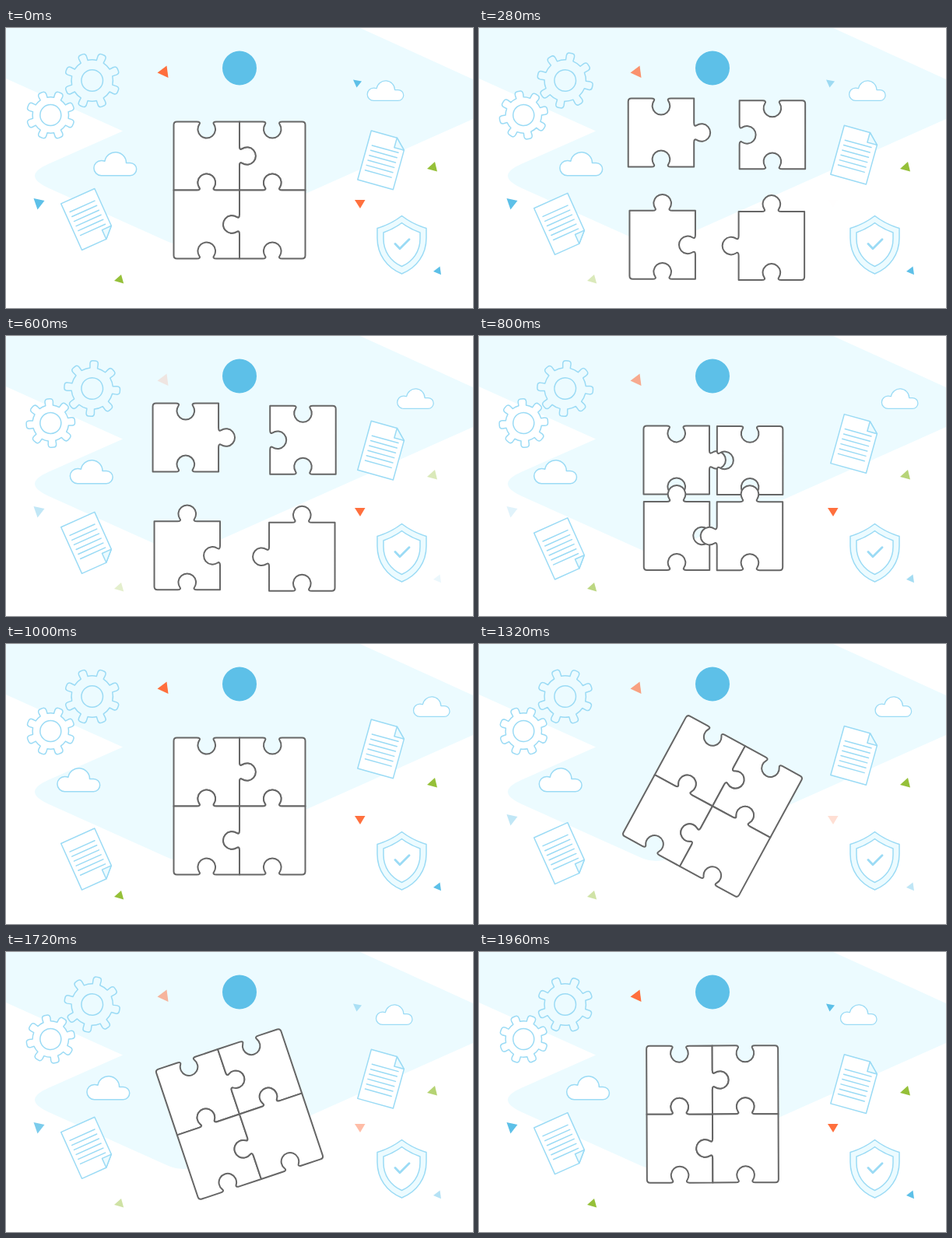
Write an HTML page that moves like this. It is 600x360 px and loops after 2 s.

```html
<!DOCTYPE html>
<html lang="en">
<head>
<meta charset="utf-8">
<title>Puzzle loop</title>
<style>
html, body { margin: 0; width: 100%; height: 100%; overflow: hidden; background: #fff; }
svg { display: block; width: 600px; height: 360px; }
.line { fill: none; stroke: #9bdbf5; stroke-width: 1.5; stroke-linejoin: round; stroke-linecap: round; }
.line * { vector-effect: non-scaling-stroke; }
.white { fill: #fff; }
.tint { fill: #ecfbff; }
.check { stroke-width: 2.8; }
#puzzle path { fill: #fff; stroke: #666; stroke-width: 2; stroke-linejoin: round; }
</style>
</head>
<body>
<svg viewBox="0 0 600 360">
  <defs>
    <path id="cloud" d="M9.6 0A9.6 9.6 0 0 1 9.6-19.2Q12-19.2 14-18.4A13.9 13.9 0 0 1 41.6-16.3H46.6A8.15 8.15 0 0 1 46.6 0Z"/>
    <g id="doc">
      <path class="white" d="M0 0H34.3L47.3 13V65.4H0Z"/>
      <path class="tint" d="M34.3 0V13H47.3Z"/>
      <path d="M6 18h35m-35 6.6h35m-35 6.6h35m-35 6.6h35m-35 6.6h35m-35 6.6h35"/>
    </g>
  </defs>
  <path class="tint" d="M0 0H455L600 66V117L247 274.5Q227 283.5 207 274.3L54 205.4Q20 190 54 175L150 132.5L0 65Z"/>
  <g class="line">
    <g id="gearBig"/>
    <g id="gearSmall" class="white"/>
    <g id="cloudLeft"><use href="#cloud" class="white" transform="translate(112.9 189.7)"/></g>
    <g id="cloudRight"><use href="#cloud" class="white" transform="translate(464.2 93.4) scale(.85)"/></g>
    <g id="docRight"><use href="#doc" transform="translate(469.3 132) rotate(15.5)"/></g>
    <g id="docLeft"><use href="#doc" transform="translate(97.5 285.5) rotate(-24.2) scale(1 -1)"/></g>
    <path class="tint" d="M508.5 241.5Q495 252 477 257.5V270C477 291 489 308 508.5 316C528 308 540 291 540 270V257.5Q522 252 508.5 241.5Z"/>
    <path class="white" d="M508.5 250.5Q498 258.5 485 263V271C485 287 494 300 508.5 306.5C523 300 532 287 532 271V263Q519 258.5 508.5 250.5Z"/>
    <path class="check" d="M500 277.5L506 283.7L518 271.7"/>
  </g>
  <g id="confetti"/>
  <circle cx="300" cy="51.5" r="22" fill="#5dc0e8"/>
  <g id="puzzle"/>
</svg>
<script>
const LOOP = 2000, CX = 300, CY = 208.5, W = 84.5, H = 88;
const ORANGE = '#ff6f3d', GREEN = '#95c038', BLUE = '#5dc0e8';
const $ = id => document.getElementById(id);

function add(parent, tag, attrs) {
  const el = document.createElementNS('http://www.w3.org/2000/svg', tag);
  for (const k in attrs) el.setAttribute(k, attrs[k]);
  return parent.appendChild(el);
}

// Gear with eight rounded teeth, centred on the origin
function gearPath(valley, tip) {
  const foot = 4.8, base = Math.sqrt(valley * valley - foot * foot);
  let d = '';
  for (let i = 0; i <= 8; i++) {
    const a = (i + .5) * Math.PI / 4, c = Math.cos(a), s = Math.sin(a);
    const p = (x, y) => `${(x * c + y * s).toFixed(2)} ${(x * s - y * c).toFixed(2)} `;
    d += (i ? `A${valley} ${valley} 0 0 1 ` : 'M') + p(-foot, base);
    if (i < 8) {
      d += 'L' + p(-5.2, tip - 4) + 'Q' + p(-5.2, tip) + p(-1.5, tip) +
        'L' + p(1.5, tip) + 'Q' + p(5.2, tip) + p(5.2, tip - 4) + 'L' + p(foot, base);
    }
  }
  return d + 'Z';
}

function makeGear(id, valley, tip, hole) {
  add($(id), 'path', { d: gearPath(valley, tip) });
  add($(id), 'circle', { r: hole });
}
makeGear('gearBig', 26.7, 35.8, 13.8);
makeGear('gearSmall', 23.2, 31.2, 13.5);

// Clockwise outline; tabs: 1 knob, -1 notch, 0 straight, from the top edge on
function piecePath(x, y, tabs, roundCorner) {
  const corners = [[x, y], [x + W, y], [x + W, y + H], [x, y + H]];
  const dirs = [[1, 0], [0, 1], [-1, 0], [0, -1]];
  let d = '';
  tabs.forEach((s, k) => {
    const [px, py] = corners[k], [dx, dy] = dirs[k];
    const len = k % 2 ? H : W, m = len / 2, next = (k + 1) % 4;
    const p = (u, v) => `${px + dx * u + dy * v} ${py + dy * u - dx * v} `;
    d += (k ? 'L' : 'M') + p(k === roundCorner ? 4 : 0, 0);
    if (s) {
      d += 'L' + p(m - 12.5, 0) +
        'C' + p(m - 9, 0) + p(m - 8, 1.4 * s) + p(m - 9.4, 3.4 * s) +
        `A11.3 11.3 0 1 ${s > 0 ? 1 : 0} ` + p(m + 9.4, 3.4 * s) +
        'C' + p(m + 8, 1.4 * s) + p(m + 9, 0) + p(m + 12.5, 0);
    }
    d += next === roundCorner
      ? 'L' + p(len - 4, 0) + 'Q' + p(len, 0) + p(len, -4)
      : 'L' + p(len, 0);
  });
  return d + 'Z';
}

// column, row, tabs, rounded corner, farthest shift
const pieces = [
  [0, 0, [-1, 1, -1, 0], 0, [-27.6, -34.8]],
  [1, 0, [-1, 0, -1, -1], 1, [40.2, -31.5]],
  [0, 1, [1, -1, -1, 0], 3, [-25.6, 30.6]],
  [1, 1, [1, 0, -1, 1], 2, [39, 32]]
].map(([col, row, tabs, corner, shift]) => ({
  shift,
  el: add($('puzzle'), 'path', { d: piecePath(CX - W + col * W, CY - H + row * H, tabs, corner) })
}));

// Opacity of each triangle at the times in KEYS
const KEYS = [0, 280, 440, 600, 1000, 1320, 1520, 1960, 2000];
const triangles = [
  ['206.5,48.5 208.5,64 194.5,57.5', ORANGE, [1, .75, .3, .15, 1, .65, .1, 1, 1]],
  ['148,317 151.2,328.5 139,325', GREEN, [1, .35, 0, .25, 1, .45, 0, 1, 1]],
  ['35.5,219 49.5,222 40.5,233.5', BLUE, [1, 1, .7, .38, 0, .38, .65, 1, 1]],
  ['446,66.5 457,68.5 450.5,76.5', BLUE, [1, .55, .25, 0, 0, 0, 0, 1, 1]],
  ['551,172 554,184.5 541,181', GREEN, [1, 1, .8, .35, 1, 1, .45, 1, 1]],
  ['448,221 461.5,221 455,232', ORANGE, [1, 0, .4, 1, 1, .22, 0, 1, 1]],
  ['557.5,306.5 559,317.2 549,313', BLUE, [1, 1, .6, .12, 1, .4, 0, 1, 1]]
].map(([points, fill, alpha]) => ({ alpha, el: add($('confetti'), 'polygon', { points, fill }) }));

function keyed(values, t) {
  let i = 1;
  while (i < KEYS.length - 1 && t > KEYS[i]) i++;
  const f = (t - KEYS[i - 1]) / (KEYS[i] - KEYS[i - 1]);
  return values[i - 1] + (values[i] - values[i - 1]) * f;
}

const smooth = u => u * u * (3 - 2 * u);

// Steep ease in and out: cubic-bezier(.866, 0, .12, 1)
function steep(x) {
  if (x <= 0) return 0;
  if (x >= 1) return 1;
  let lo = 0, hi = 1, u;
  for (let i = 0; i < 24; i++) {
    u = (lo + hi) / 2;
    const v = 1 - u;
    if (3 * .866 * u * v * v + 3 * .12 * u * u * v + u * u * u < x) lo = u; else hi = u;
  }
  return smooth(u);
}

const move = (el, x, y, turn = 0) =>
  el.setAttribute('transform', `translate(${x} ${y}) rotate(${turn})`);

function draw(t) {
  const sway = smooth(1 - Math.abs(t / 1000 - 1));
  move($('gearBig'), 110.7, 67.5, 180 * sway);
  move($('gearSmall'), 57.3, 112, -180 * sway);
  move($('cloudLeft'), -47 * sway, 0);
  move($('cloudRight'), 59.3 * sway, 0);
  move($('docRight'), 0, -35 * sway);
  move($('docLeft'), 0, 30.6 * sway);

  const apart = t < 500 ? steep(t / 462) : 1 - steep((t - 500) / 500);
  for (const { el, shift } of pieces) move(el, shift[0] * apart, shift[1] * apart);
  $('puzzle').setAttribute('transform', `rotate(${360 * steep((t - 1000) / 1000)} ${CX} ${CY})`);

  for (const { el, alpha } of triangles) el.setAttribute('opacity', keyed(alpha, t));
}

const start = performance.now();
function tick() {
  draw((performance.now() - start) % LOOP);
  requestAnimationFrame(tick);
}
tick();
</script>
</body>
</html>
```
